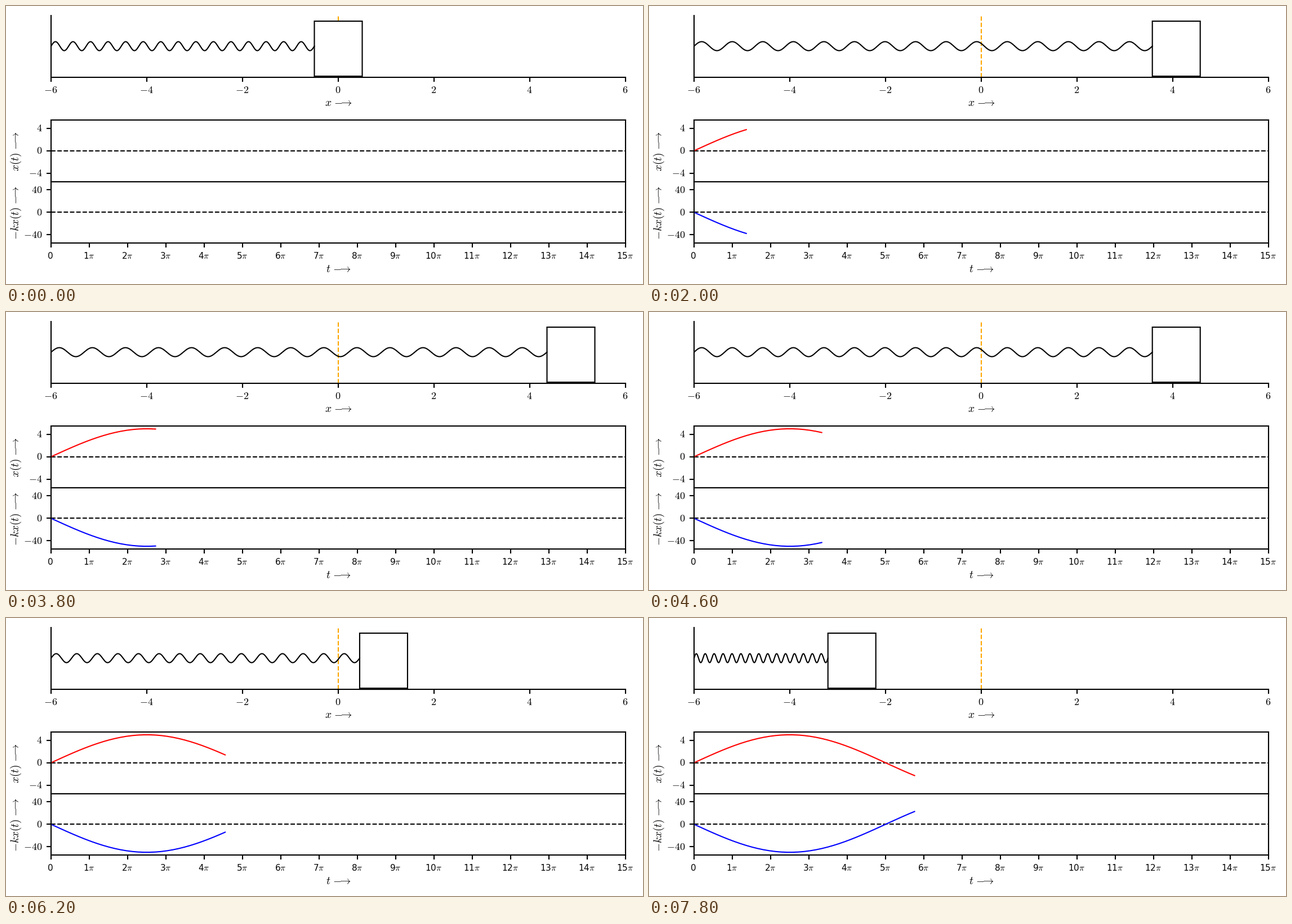
These frames come from a looping animation (1131 px wide and 495 px high, 8000 ms). A matplotlib script:

```python
import numpy as np
import matplotlib.pyplot as plt
from matplotlib.animation import FuncAnimation
from matplotlib.patches import Rectangle

W, H, DPI = 1131, 495, 100
LEFT, WIDTH, HEIGHT = 80, 1020, 109.6
FRAMES, INTERVAL = 40, 200
T_MAX = 15 * np.pi
AMP, OMEGA, K = 5, 0.2, 10
COILS = 15
LW = 1.52

plt.rcParams.update({
    "font.family": "DejaVu Sans",
    "mathtext.fontset": "cm",
    "axes.linewidth": LW,
    "lines.linewidth": LW,
})

t = np.linspace(0, T_MAX, 100)
x = AMP * np.sin(OMEGA * t)
u = np.linspace(0, 1, 1000)
coil = 55 + 8 * np.sin(2 * np.pi * COILS * u)

fig = plt.figure(figsize=(W / DPI, H / DPI), dpi=DPI, facecolor="white")


def panel(top, height, xlim, ylim):
    """Axes whose top edge lies `top` pixels below the stage's top."""
    ax = fig.add_axes([LEFT / W, 1 - (top + height) / H, WIDTH / W, height / H])
    ax.set(xlim=xlim, ylim=ylim)
    ax.tick_params(length=6, width=LW, labelbottom=False, labelleft=False)
    return ax


def label(px, py, s, size=14, ha="left", rotation=0):
    """Text with its baseline at pixel (px, py), counted from top left."""
    fig.text(px / W, 1 - py / H, s, size=size, ha=ha, va="baseline",
             rotation=rotation, rotation_mode="anchor")


def axis_label(px, py, s, rotation=0):
    arrow = r"\hspace{0.316}{-}\hspace{-0.39}\rightarrow"
    label(px, py, f"${s}{arrow}$", rotation=rotation)


top_ax = panel(16.5, 110, (-6, 6), (0, 110))
top_ax.spines[["top", "right"]].set_visible(False)
top_ax.set_xticks(range(-6, 7, 2))
top_ax.set_yticks([])
top_ax.axvline(0, color="orange", ls="--", zorder=1)
box = top_ax.add_patch(Rectangle((-0.5, 1.5), 1, 98, fc="white", ec="black",
                                 lw=LW, snap=False, zorder=2))
spring, = top_ax.plot([], [], color="black")
for v in range(-6, 7, 2):
    label(LEFT + 85 * (v + 6) - 1, 154.6, f"${v}$", size=13, ha="center")
axis_label(566, 178.3, "x")


def graph(top, scale, color):
    """Time plot with a dashed zero line; returns the growing curve."""
    ax = panel(top, HEIGHT, (0, T_MAX), (-5.5 * scale, 5.5 * scale))
    ax.set_yticks([-4 * scale, 0, 4 * scale])
    ax.axhline(0, color="black", ls="--")
    for v in (-4, 0, 4):
        y = top + HEIGHT / 2 - v * HEIGHT / 11
        label(64.4, y + 5.6, f"${v * scale}$", size=13, ha="right")
    curve, = ax.plot([], [], color=color)
    return ax, curve


pos_ax, pos_curve = graph(202.95, 1, "red")
force_ax, force_curve = graph(202.95 + HEIGHT, K, "blue")
pos_ax.set_xticks([])
force_ax.set_xticks(np.pi * np.arange(16))
axis_label(23.3, 294, "x(t)", rotation=90)
axis_label(23.3, 416.5, "-kx(t)", rotation=90)
for n in range(16):
    text = rf"{n}$\pi$" if n else "0"
    label(LEFT + 68 * n - 1, 450.5, text, size=11, ha="center")
axis_label(568, 473.5, "t")


def update(i):
    edge = x[i] - 0.5
    box.set_x(edge)
    spring.set_data(-6 + (edge + 6) * u, coil)
    # The curves trail the mass by one sample
    pos_curve.set_data(t[:i], x[:i])
    force_curve.set_data(t[:i], -K * x[:i])
    return box, spring, pos_curve, force_curve


anim = FuncAnimation(fig, update, frames=FRAMES, interval=INTERVAL,
                     repeat=True, repeat_delay=0, blit=False)
plt.show()
```
